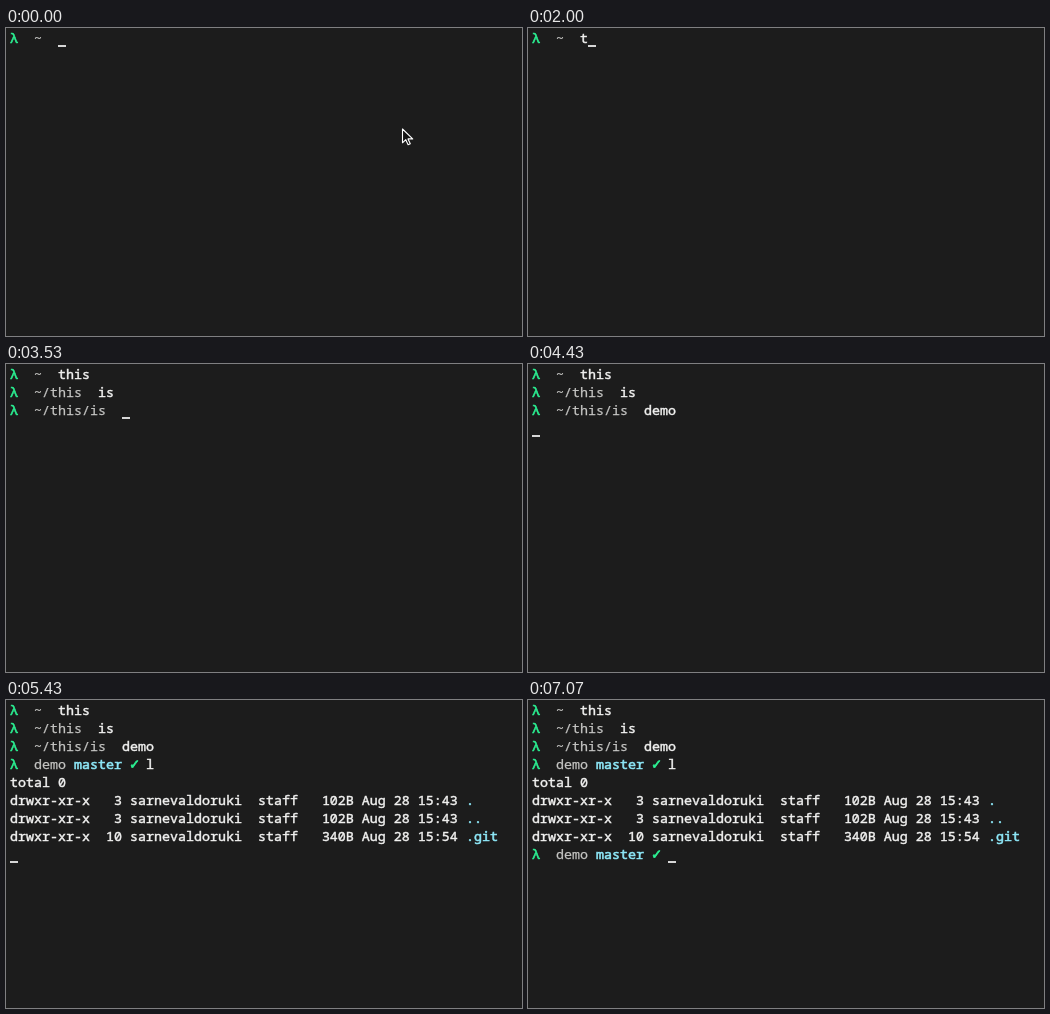
An HTML page for the animation above (7830 ms loop, 516x308 px).

```html
<!DOCTYPE html>
<html lang="en">
<head>
<meta charset="utf-8">
<title>Terminal prompt demo</title>
<style>
  html, body { margin: 0; width: 100%; height: 100%; overflow: hidden; background: #1c1c1c; }
  svg { display: block; width: 516px; height: 308px; background: #1c1c1c; }
  /* A thin stroke gives the medium weight between regular and bold. */
  text {
    font: 400 13.333px "Noto Sans Mono", "DejaVu Sans Mono", monospace;
    white-space: pre; fill: var(--ink); stroke: var(--ink); stroke-width: .45;
  }
  .lambda, .check { --ink: #2bf293; }
  .lambda, .cyan { stroke-width: .6; }
  .check { font-size: 15px; font-family: "DejaVu Sans Mono", monospace; stroke-width: .8; }
  .path { --ink: #c4c4c2; stroke-width: .25; }
  .cmd, .out { --ink: #f1f1f0; }
  .cyan { --ink: #8ee8f8; }
  #caret { fill: #d6d6d6; }
  #arrow { fill: #141414; stroke: #fff; stroke-width: 1.1; stroke-linejoin: round; }
  #beam { fill: none; stroke: #f4f4f4; stroke-width: 1.1; }
</style>
</head>
<body>
<svg id="stage" viewBox="0 0 516 308">
  <g id="screen"></g>
  <rect id="caret" width="8" height="2"/>
  <path id="arrow" d="M.5 1V14.8l3.3-3.1 2.3 5 2.2-1-2.3-4.8h4.7z"/>
  <path id="beam" d="M-3-7.5Q0-7.5 0-5V5Q0 7.5-3 7.5M3-7.5Q0-7.5 0-5M3 7.5Q0 7.5 0 5M-1.7 2.5H1.7"/>
</svg>
<script>
const LOOP = 7830, CELL = 8, LINE = 18, LEFT = 4;
const byId = id => document.getElementById(id);
const screen = byId("screen"), caret = byId("caret"), arrow = byId("arrow"), beam = byId("beam");
const colX = col => LEFT + col * CELL;

const parts = [];   // text with the time it appears
const carets = [];  // [time, column, row]

function put(time, row, col, kind, str) {
  const node = document.createElementNS("http://www.w3.org/2000/svg", "text");
  node.setAttribute("x", colX(col));
  node.setAttribute("y", 15 + row * LINE);
  node.setAttribute("class", kind);
  node.textContent = str;
  screen.append(node);
  parts.push({ time, node });
}

function prompt(time, row, path) {
  put(time, row, 0, "lambda", "λ");
  put(time, row, 3, "path", path);
  carets.push([time, path.length + 5, row]);
}

function gitPrompt(time, row) {
  put(time, row, 0, "lambda", "λ");
  put(time, row, 3, "path", "demo");
  put(time, row, 8, "cyan", "master");
  put(time, row, 15, "check", "✓");
  carets.push([time, 17, row]);
}

function type(str, row, col, times) {
  times.forEach((time, i) => {
    put(time, row, col + i, "cmd", str[i]);
    carets.push([time, col + i + 1, row]);
  });
}

const enter = (time, row) => carets.push([time, 0, row]);

function list(time, row, links, size, clock, name) {
  const user = "sarnevaldoruki";
  put(time, row, 0, "out",
    `drwxr-xr-x  ${links.padStart(2)} ${user}  staff   ${size} Aug 28 ${clock}`);
  put(time, row, 57, "cyan", name);
}

prompt(0, 0, "~");
type("this", 0, 6, [1970, 2070, 2170, 2270]);
enter(2400, 1);
prompt(2470, 1, "~/this");
type("is", 1, 11, [2770, 2870]);
enter(3270, 2);
prompt(3330, 2, "~/this/is");
type("demo", 2, 14, [3570, 3670, 3770, 3870]);
enter(4070, 3);
gitPrompt(4470, 3);
type("l", 3, 17, [4970]);
enter(5400, 8);
put(5400, 4, 0, "out", "total 0");
list(5400, 5, "3", "102B", "15:43", ".");
list(5400, 6, "3", "102B", "15:43", "..");
list(5400, 7, "10", "340B", "15:54", ".git");
gitPrompt(5600, 8);

const arrowSteps = [[0, 396, 100], [30, 374, 93], [70, 349, 84], [100, 338, 80]];
const last = (steps, t) => steps.filter(s => s[0] <= t).pop();
const show = (node, on) => node.setAttribute("visibility", on ? "visible" : "hidden");
const move = (node, x, y) => node.setAttribute("transform", `translate(${x} ${y})`);
const curve = (a, b, c, u) => (1 - u) ** 2 * a + 2 * u * (1 - u) * b + u * u * c;

function draw(t) {
  for (const p of parts) show(p.node, t >= p.time);

  const [, col, row] = last(carets, t);
  move(caret, colX(col), 17 + row * LINE);

  const [, x, y] = last(arrowSteps, t);
  move(arrow, x, y);
  show(arrow, t < 300);

  // The pointer rests, hides while typing, then leaves to the upper right.
  const leaving = t >= 6500 && t < 6830;
  const u = leaving ? Math.floor((t - 6500) / 33) / 10 : 0;
  move(beam, curve(338.5, 410, 518, u), curve(82, 131, 38, u));
  show(beam, (t >= 300 && t < 1970) || leaving);
}

const start = performance.now();
function tick() {
  draw((performance.now() - start) % LOOP);
  requestAnimationFrame(tick);
}
draw(0);
requestAnimationFrame(tick);
</script>
</body>
</html>
```
